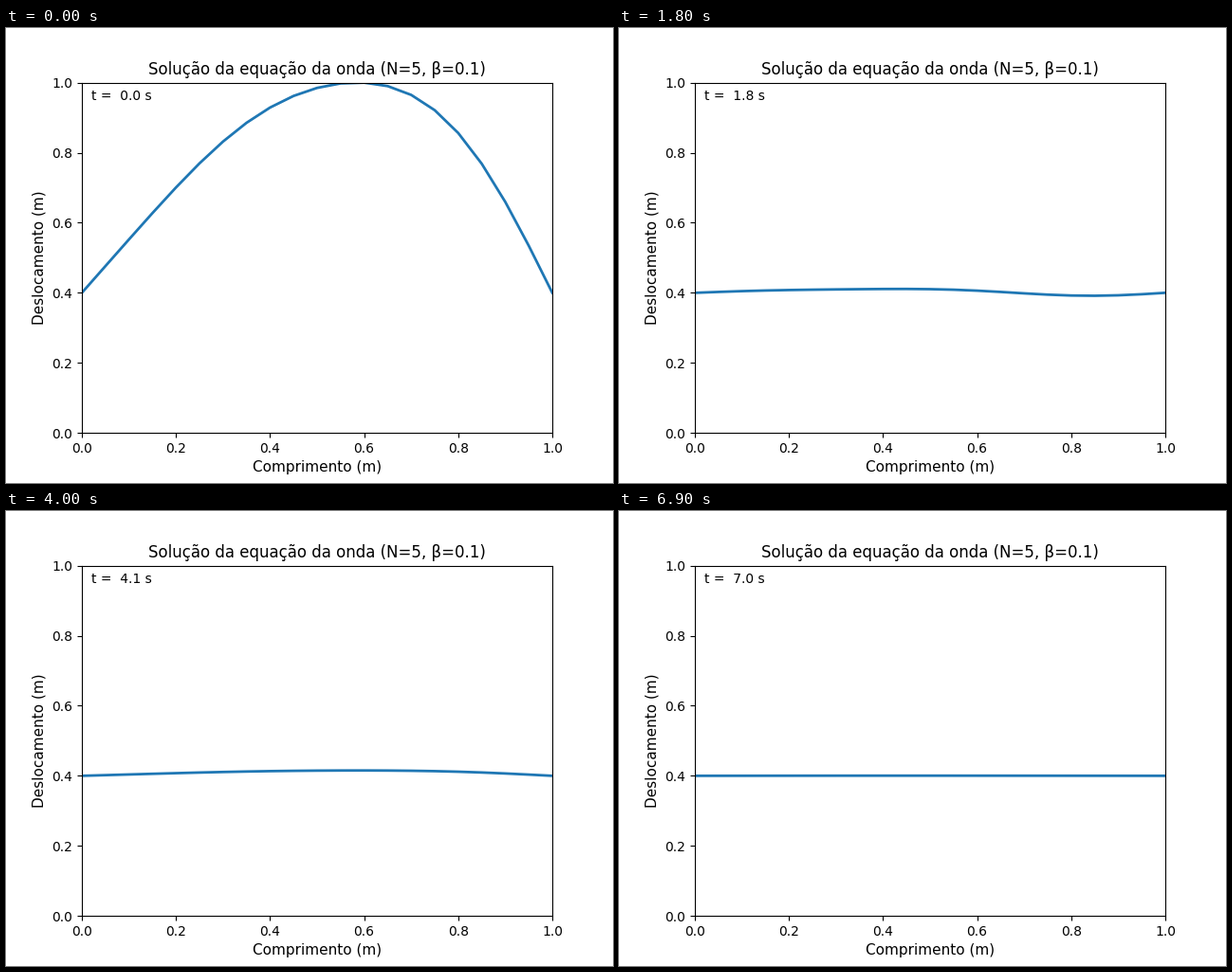
Animation, 640 px wide and 480 px high, one loop 7000 ms. Source, as a matplotlib script:

```python
import numpy as np
import matplotlib.pyplot as plt
from matplotlib.animation import FuncAnimation

FRAMES = 70
STEP = 0.1      # seconds of motion per frame
REST = 0.4      # height of the string at rest
HEIGHT = 0.6    # largest initial displacement
DAMPING = 0.9

x = np.linspace(0, 1, 21)
labels = np.linspace(0, 7, FRAMES)

# Sine modes of x - x**3, scaled to the initial height
n = np.arange(1, 5)
shapes = np.sin(np.pi * np.outer(x, n))
coeffs = (-1.0) ** (n + 1) / n**3
coeffs *= HEIGHT / (shapes @ coeffs).max()
omega = np.sqrt(((n + 1) * np.pi) ** 2 - DAMPING**2)


def displacement(t):
    """Damped modes released from rest."""
    swing = np.cos(omega * t) + DAMPING / omega * np.sin(omega * t)
    return REST + shapes @ (coeffs * np.exp(-DAMPING * t) * swing)


plt.rcParams["font.family"] = "DejaVu Sans"
fig, ax = plt.subplots(figsize=(6.4, 4.8), dpi=100)
ax.set(xlim=(0, 1), ylim=(0, 1))
ax.set_title("Solução da equação da onda (N=5, β=0.1)", fontsize=12)
ax.set_xlabel("Comprimento (m)", fontsize=11)
ax.set_ylabel("Deslocamento (m)", fontsize=11)
line, = ax.plot(x, displacement(0), color="#1f77b4", lw=2)
clock = ax.text(0.02, 0.95, "", fontsize=10)


def update(i):
    line.set_ydata(displacement(i * STEP))
    clock.set_text(f"t = {labels[i]:4.1f} s")
    return line, clock


anim = FuncAnimation(fig, update, frames=FRAMES, interval=100, repeat=True)
plt.show()
```
